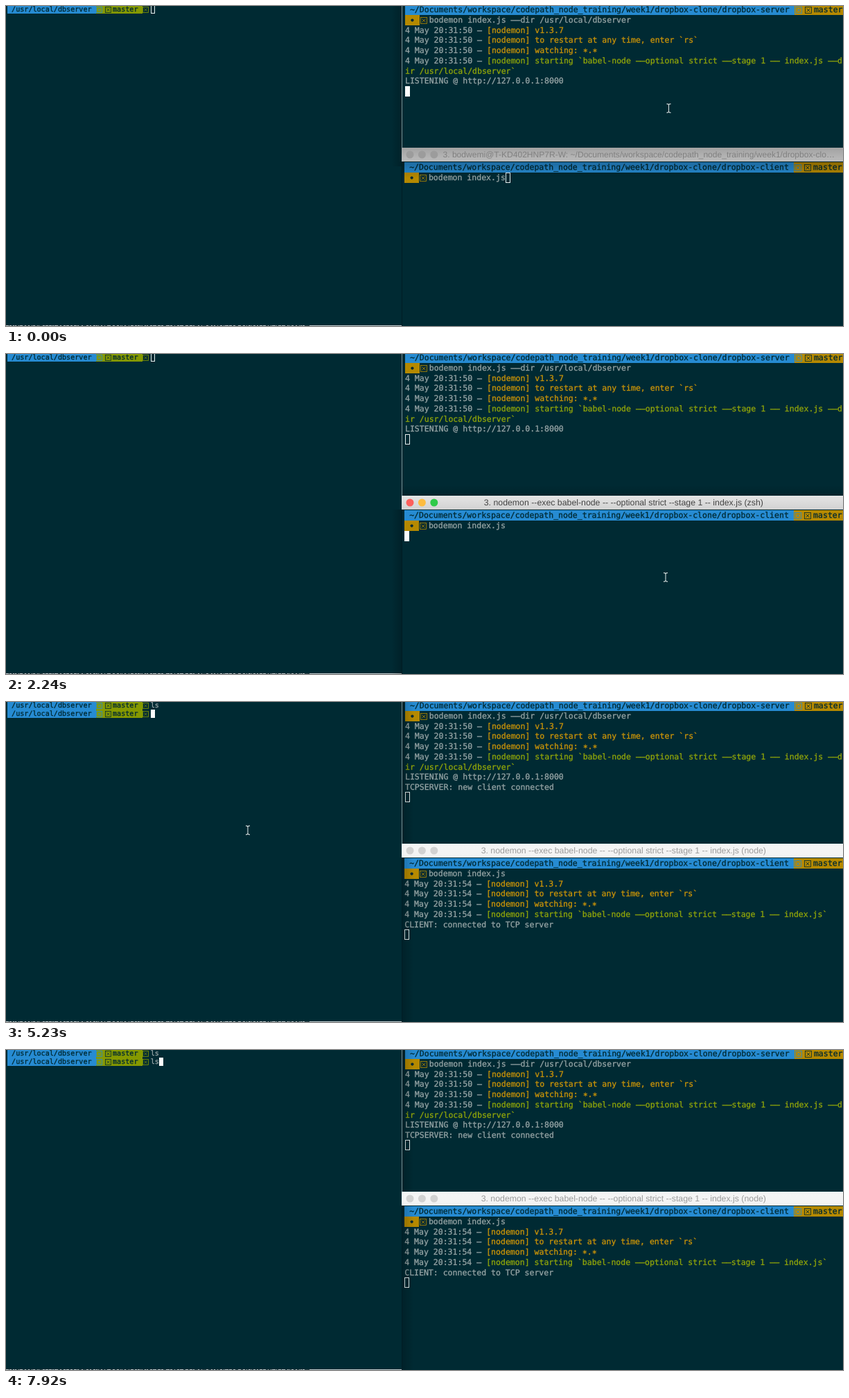
Recreate the animation shown at these times as an HTML page with a canvas. Size 1208 by 463 pixels, loop 8000 ms.

```html
<!DOCTYPE html>
<html lang="en">
<head>
<meta charset="utf-8">
<title>Terminals</title>
<style>
html, body { margin: 0; width: 100%; height: 100%; overflow: hidden; background: #002a33; }
canvas { display: block; }
</style>
</head>
<body>
<canvas id="stage" width="1208" height="463"></canvas>
<script>
const ctx = document.getElementById('stage').getContext('2d');
const LOOP = 8000, W = 1208, H = 463, EDGE = 571, BAR = 205, BAR_H = 20;
const BG = '#002a33', BLUE = '#268bd2', GREEN = '#859900', YELLOW = '#b58900';
const AMBER = '#cb9408', LIME = '#90a50a', GRAY = '#96a4a5', WHITE = '#fdfdfd';
const MONO = '"DejaVu Sans Mono", monospace', SANS = '"Liberation Sans", sans-serif';

// Character grids: x and y are the corner of the first cell.
const left = { x: 2, y: -1, cw: 6.08, ch: 12, size: 10.1, base: 9.2 };
const upper = { x: 576, y: -1.8, cw: 6.94, ch: 14.7, size: 11.53, base: 11.1 };
const lower = { ...upper, x: 575.2, y: 226.2 };

const RUN = 'nodemon --exec babel-node -- --optional strict --stage 1 -- index.js';
const HOME = '3. bodwemi@T-KD402HNP7R-W: ~/Documents/workspace/codepath_node_training/week1/dropbox-clo…';
const ROOT = '~/Documents/workspace/codepath_node_training/week1/dropbox-clone/dropbox-';

// Pointer stops: [start ms, x, y, kind]
const POINTER = [
  [0, 956.5, 148, 'beam'], [150, 972, 273, 'beam'], [300, 959, 319, 'beam'],
  [450, 955, 326, 'beam'], [1050, 952, 323, 'beam'], [3430, 958, 323, 'beam'],
  [3580, 0, 0, ''], [5230, 349, 185.5, 'beam'], [7180, 529, 213, 'beam'],
  [7330, 729, 396, 'arrow'], [7480, 938, 381, 'arrow'], [7620, 1067, 385.5, 'arrow'],
  [7770, 1130, 407, 'arrow'], [7920, 0, 0, '']
];
const TYPED = [[5230, ''], [5530, 'ls'], [5830, 'touch index.html'], [6580, 'ls']];

const at = (list, t) => list.filter(step => step[0] <= t).pop();

function rect(x, y, w, h, color) {
  ctx.fillStyle = color;
  ctx.fillRect(x, y, w, h);
}

function fade(x, y, w, h, vertical, from, to) {
  const g = vertical ? ctx.createLinearGradient(0, y, 0, y + h) : ctx.createLinearGradient(x, 0, x + w, 0);
  g.addColorStop(0, from);
  g.addColorStop(1, to);
  rect(x, y, w, h, g);
}

const cellX = (g, col) => g.x + col * g.cw;
const cellY = (g, row) => Math.round(g.y + row * g.ch);

function put(g, col, row, text, color) {
  ctx.font = `${g.size}px ${MONO}`;
  ctx.textAlign = 'left';
  ctx.fillStyle = ctx.strokeStyle = color;
  ctx.lineWidth = 0.3;
  // Free-standing dashes are drawn wide so that pairs join.
  const shown = text.replace(/(?<![a-z])-|-(?![a-z])/g, '–');
  const x = cellX(g, col), y = g.y + row * g.ch + g.base;
  ctx.fillText(shown, x, y);
  ctx.strokeText(shown, x, y);
}

function band(g, col, row, cols, color) {
  const x = Math.round(cellX(g, col)), y = cellY(g, row);
  rect(x, y, Math.round(cellX(g, col + cols)) - x, cellY(g, row + 1) - y, color);
}

// Box shown for a glyph the font lacks.
function tofu(g, col, row, color) {
  const s = Math.round(g.size * 0.75);
  const x = Math.round(cellX(g, col) + g.size * 0.07) + 0.5;
  const y = cellY(g, row) + (g.ch > 13 ? 3.5 : 2.5);
  ctx.strokeStyle = color;
  ctx.lineWidth = 0.8;
  ctx.strokeRect(x, y, s, s);
  ctx.beginPath();
  ctx.moveTo(x + 2, y + 2);
  ctx.lineTo(x + s - 2, y + s - 2);
  ctx.moveTo(x + s - 2, y + 2);
  ctx.lineTo(x + 2, y + s - 2);
  ctx.stroke();
}

function caret(g, col, row, filled) {
  const x = Math.round(cellX(g, col)), y = cellY(g, row);
  const w = Math.round(g.cw), h = Math.round(g.ch);
  if (filled) return rect(x, y, w, h, WHITE);
  ctx.strokeStyle = '#e8eeee';
  ctx.lineWidth = 1;
  ctx.strokeRect(x + 0.5, y + 0.5, w - 1, h - 1);
}

function prompt(g, row, path, color) {
  const end = path.length + 2;
  band(g, 0, row, end, BLUE);
  band(g, end, row, 11, color);
  put(g, 1, row, path, BG);
  tofu(g, end, row, BLUE);
  tofu(g, end + 2, row, BG);
  put(g, end + 4, row, 'master', BG);
}

function leftPrompt(row, command) {
  prompt(left, row, '/usr/local/dbserver', GREEN);
  tofu(left, 32, row, GREEN);
  put(left, 34, row, command, GRAY);
}

function rightPrompt(g, folder, command) {
  prompt(g, 0, ROOT + folder, YELLOW);
  band(g, 0, 1, 3, YELLOW);
  ctx.fillStyle = BG;
  ctx.beginPath();
  ctx.arc(cellX(g, 1.5), g.y + g.ch * 1.52, 2.1, 0, 7);
  ctx.fill();
  tofu(g, 3, 1, YELLOW);
  put(g, 5, 1, command, GRAY);
}

function startLog(g, time, start) {
  const lines = ['v1.3.7', 'to restart at any time, enter `rs`', 'watching: ∗.∗', start];
  lines.forEach((line, i) => {
    put(g, 0, i + 2, `4 May ${time} -`, GRAY);
    put(g, 17, i + 2, '[nodemon] ' + line, i < 3 ? AMBER : LIME);
  });
}

function drawLeft(t) {
  const done = t >= 5230;
  leftPrompt(0, done ? 'ls' : '');
  if (done) {
    const text = at(TYPED, t)[1];
    leftPrompt(1, text);
    caret(left, 34 + text.length, 1, true);
  } else {
    caret(left, 34, 0, false);
  }
  // Tops of the text in a window peeking out below.
  rect(0, 462, EDGE, 1, '#c5cbcc');
  let seed = 7;
  for (let x = 4; x < 437; x += 2 + seed % 5) {
    seed = (seed * 73 + 41) % 997;
    rect(x, 462, 1 + seed % 3, 1, '#39484c');
  }
}

function drawUpper(t, focus) {
  rightPrompt(upper, 'server', 'bodemon index.js --dir /usr/local/dbserver');
  startLog(upper, '20:31:50', 'starting `babel-node --optional strict --stage 1 -- index.js --d');
  put(upper, 0, 6, 'ir /usr/local/dbserver`', LIME);
  put(upper, 0, 7, 'LISTENING @ http://127.0.0.1:8000', GRAY);
  const joined = t >= 2990;
  if (joined) put(upper, 0, 8, 'TCPSERVER: new client connected', GRAY);
  caret(upper, 0, joined ? 9 : 8, focus === 'upper');
}

function drawLower(t, focus) {
  rightPrompt(lower, 'client', 'bodemon index.js');
  if (t >= 2390) startLog(lower, '20:31:54', 'starting `babel-node --optional strict --stage 1 -- index.js`');
  if (t >= 2990) put(lower, 0, 6, 'CLIENT: connected to TCP server', GRAY);
  const row = t < 2240 ? 1 : t < 2390 ? 2 : t < 2990 ? 6 : 7;
  caret(lower, row === 1 ? 21 : 0, row, focus === 'lower');
}

function drawBar(t, focus) {
  const look = {
    upper: ['#a2a2a2', '#bcbcbc', '#808080', ['#9c9c9c', '#9c9c9c', '#9c9c9c']],
    lower: ['#e4e4e4', '#d2d2d2', '#444444', ['#fc605c', '#fdbc40', '#2fca48']],
    left: ['#f5f5f5', '#f3f3f3', '#9c9c9c', ['#d2d2d2', '#d2d2d2', '#d2d2d2']]
  }[focus];
  fade(EDGE, BAR, W - EDGE, BAR_H, true, look[0], look[1]);
  look[3].forEach((color, i) => {
    ctx.fillStyle = color;
    ctx.beginPath();
    ctx.arc(583 + i * 17.4, 215, 5.5, 0, 7);
    ctx.fill();
  });
  const home = t < 2240;
  ctx.font = `${home ? 12.06 : 12.32}px ${SANS}`;
  ctx.textAlign = home ? 'left' : 'center';
  ctx.fillStyle = look[2];
  ctx.fillText(home ? HOME : `3. ${RUN} (${t < 3130 ? 'zsh' : 'node'})`, home ? 630.5 : 891.3, 219.3);
}

function drawShadows(focus) {
  const clear = 'rgba(0,0,0,0)', dark = 'rgba(0,0,0,.2)', below = BAR + BAR_H;
  if (focus === 'upper') {
    fade(556, 0, 15, 232, false, clear, dark);
    fade(EDGE, below, W - EDGE, 24, true, 'rgba(0,0,0,.25)', clear);
  } else if (focus === 'lower') {
    fade(556, below, 15, H - below, false, clear, dark);
    fade(EDGE, 190, W - EDGE, BAR - 190, true, clear, 'rgba(0,0,0,.16)');
  } else {
    fade(EDGE, 0, 18, BAR, false, dark, clear);
    fade(EDGE, below, 18, H - below, false, dark, clear);
  }
  rect(EDGE, 0, 1, BAR, '#7f9094');
  rect(EDGE, below, 1, H - below, '#001d25');
}

function drawBeam(x, y) {
  ctx.strokeStyle = '#d3dbdb';
  ctx.lineWidth = 1.1;
  ctx.beginPath();
  for (const d of [-1, 1]) {
    ctx.moveTo(x - 3, y + d * 6.4);
    ctx.quadraticCurveTo(x, y + d * 6.4, x, y + d * 4.5);
    ctx.quadraticCurveTo(x, y + d * 6.4, x + 3, y + d * 6.4);
  }
  ctx.moveTo(x, y - 5);
  ctx.lineTo(x, y + 5);
  ctx.stroke();
}

function drawArrow(x, y) {
  const shape = [[0.5, 0.8], [0.5, 11.6], [3, 9.4], [4.8, 13.5], [6.8, 12.6], [5, 8.8], [9.3, 8.6]];
  ctx.beginPath();
  shape.forEach(([dx, dy]) => ctx.lineTo(x + dx, y + dy));
  ctx.closePath();
  ctx.fillStyle = '#000';
  ctx.fill();
  ctx.strokeStyle = '#fff';
  ctx.lineWidth = 1;
  ctx.stroke();
}

function draw(t) {
  const focus = t < 1200 ? 'upper' : t < 5230 ? 'lower' : 'left';
  ctx.textRendering = 'geometricPrecision';
  ctx.lineJoin = 'miter';
  rect(0, 0, W, H, BG);
  drawLeft(t);
  drawUpper(t, focus);
  drawLower(t, focus);
  drawShadows(focus);
  drawBar(t, focus);
  const [, x, y, kind] = at(POINTER, t);
  if (kind === 'beam') drawBeam(x, y);
  if (kind === 'arrow') drawArrow(x, y);
}

const origin = performance.now();
function tick() {
  draw((performance.now() - origin) % LOOP);
  requestAnimationFrame(tick);
}
tick();
</script>
</body>
</html>
```
